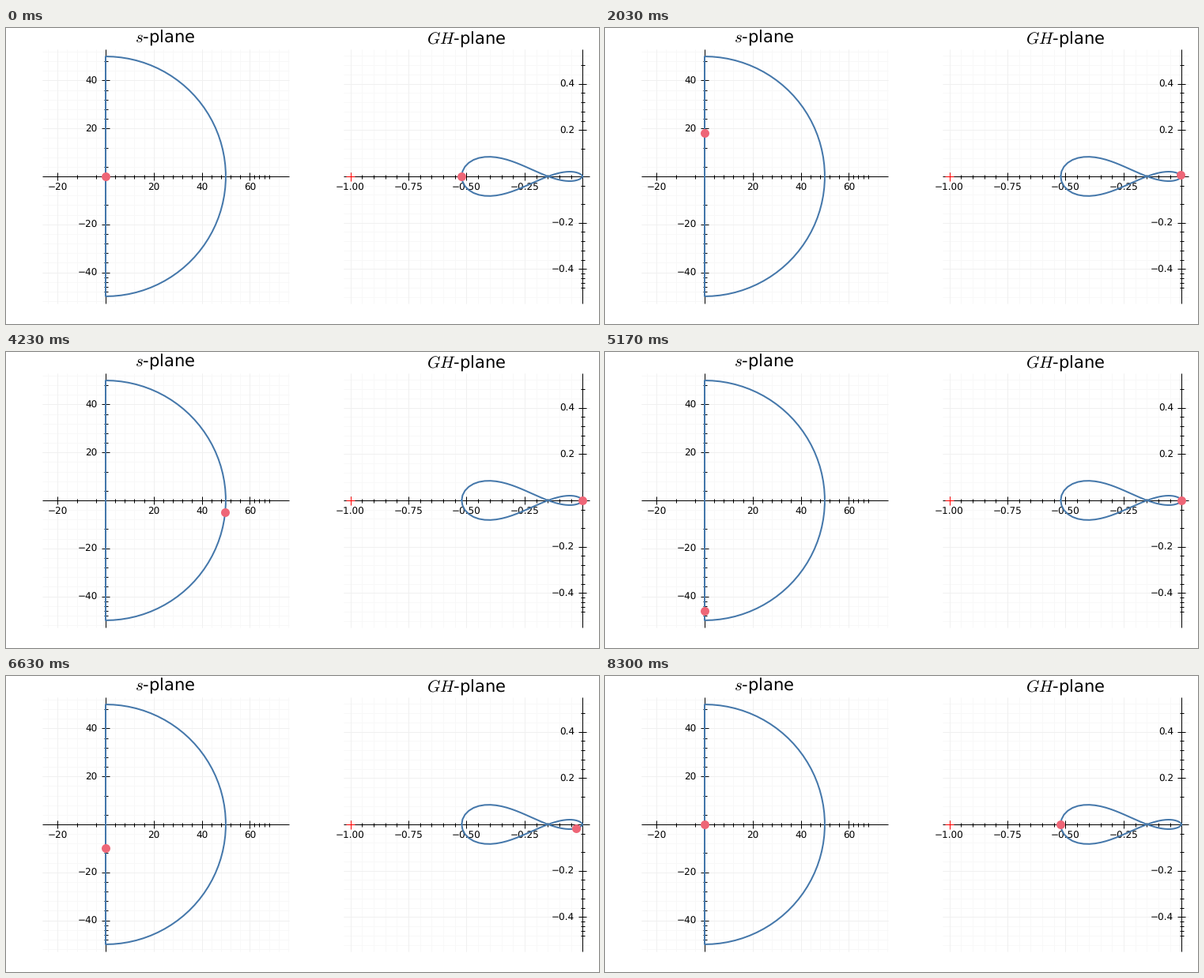
These frames come from a looping animation (750x375 px, 8.33 s). A matplotlib script:

```python
import matplotlib.pyplot as plt
import numpy as np
from matplotlib.animation import FuncAnimation

PX = 0.72  # points per pixel at 100 dpi
BLUE, ROSE = "#4477aa", "#ee6677"
LOOP_MS, SEG = 8330, 50

plt.rcParams.update({"font.family": "DejaVu Sans", "mathtext.fontset": "cm",
                     "text.hinting": "none", "text.hinting_factor": 1})

fig = plt.figure(figsize=(7.5, 3.75), dpi=100, facecolor="white")
ax = fig.add_axes([0, 0, 1, 1])
ax.set(xlim=(0, 750), ylim=(375, 0))
ax.axis("off")


def loop_gain(s):
    return 50 / ((s - 2) * (s + 6) * (s + 8))


def nyquist_contour():
    """Up the imaginary axis, around the right half plane and back to zero."""
    def climb(a, b):
        return 1j * np.linspace(a, b, SEG)

    arc = 50 * np.exp(1j * np.linspace(np.pi / 2, -np.pi / 2, SEG))
    return np.concatenate([climb(0, 10), climb(10, 50), arc,
                           climb(-50, -10), climb(-10, 0)])


def segments(x0, y0, x1, y1, color, width, z):
    """Many separate straight lines drawn as one artist."""
    x0, y0, x1, y1 = np.broadcast_arrays(x0, y0, x1, y1)
    for a, b, c, d in zip(x0.ravel(), y0.ravel(), x1.ravel(), y1.ravel()):
        ax.plot([a, c], [b, d], color=color, lw=width * PX, zorder=z,
                solid_capstyle="butt")


class Plane:
    top, bottom, y0 = 27, 349, 188

    def __init__(self, left, right, x0, scale):
        self.left, self.right, self.x0, self.scale = left, right, x0, scale

    def px(self, x):
        return self.x0 + self.scale * np.asarray(x, float)

    def py(self, y):
        return self.y0 - self.scale * np.asarray(y, float)

    def grid(self, xs, ys, color, z):
        segments(self.px(xs), self.top, self.px(xs), self.bottom, color, 1, z)
        segments(self.left, self.py(ys), self.right, self.py(ys), color, 1, z)

    def axes(self):
        segments(self.left, self.y0, self.right, self.y0, "black", 1, 3)
        segments(self.x0, self.top, self.x0, self.bottom, "black", 1, 3)

    def ticks(self, xs, ys, size):
        x, y = self.px(xs), self.py(ys)
        segments(x, self.y0 - size, x, self.y0 + size, "black", 1, 3)
        segments(self.x0 - size, y, self.x0 + size, y, "black", 1, 3)

    def labels(self, xs, ys, xfmt, yfmt):
        for x in xs:
            self.label(self.px(x), self.y0 + 17.4, xfmt % x, "center")
        for y in ys:
            self.label(self.x0 - 10.2, self.py(y) + 4.4, yfmt % y, "right")

    @staticmethod
    def label(x, y, text, ha):
        ax.text(x, y, text.replace("-", "\u2212"), ha=ha, va="baseline",
                size=12 * PX, zorder=4)

    def title(self, text, y):
        ax.text((self.left + self.right) / 2, y, text, ha="center",
                va="baseline", size=21 * PX)

    def curve(self, z):
        ax.plot(self.px(z.real), self.py(z.imag), color=BLUE, lw=2 * PX,
                solid_joinstyle="round", zorder=5)

    def dot(self):
        return ax.plot([], [], "o", ms=11 * PX, color=ROSE, mew=0, zorder=6)[0]

    def place(self, dot, z):
        dot.set_data([self.px(z.real)], [self.py(z.imag)])


contour = nyquist_contour()
image = loop_gain(contour)

s_plane = Plane(46, 357.5, 126, 3.039)
gh_plane = Plane(426.5, 738, 729.3, 293.7)

# Minor ticks are unevenly spaced around the origin and past the last major.
fine = np.arange(1, 5)
s_x, s_y = [-20, 20, 40, 60], [-40, -20, 20, 40]
s_minor_x = np.r_[-12, -4, 4 * fine, 20 + 4 * fine, 40 + 4 * fine, 60 + 2 * fine]
s_minor_y = np.r_[48, 20 + 4 * fine, 12, 4, -12, -20 - 4 * fine, -40 - 2 * fine]
gh_x, gh_y = [-1, -0.75, -0.5, -0.25], [-0.4, -0.2, 0.2, 0.4]
gh_minor_x = np.add.outer(gh_x, 0.05 * fine).ravel()
gh_minor_y = np.r_[48, 20 + 4 * fine, 12, -4, -12, -20 - 4 * fine, -40 - 2 * fine] / 100

s_plane.grid(np.arange(-24, 77, 4), np.arange(-52, 53, 4), "#f8f8f8", 1)
s_plane.grid(s_x + [0], s_y + [0], "#f0f0f0", 2)
gh_plane.grid(np.arange(-20, 1) / 20, np.arange(-13, 14) / 25, "#f8f8f8", 1)
gh_plane.grid(gh_x + [0], gh_y + [0], "#f0f0f0", 2)

for plane, major, minor in ((s_plane, (s_x, s_y), (s_minor_x, s_minor_y)),
                            (gh_plane, (gh_x, gh_y), (gh_minor_x, gh_minor_y))):
    plane.axes()
    plane.ticks(*major, 5)
    plane.ticks(*minor, 2.5)

s_plane.labels(s_x, s_y, "%d", "%d")
gh_plane.labels(gh_x, gh_y, "%.2f", "%.1f")
s_plane.title("$s$-plane", 18.3)
gh_plane.title("$GH$-plane", 20.7)

s_plane.curve(contour)
gh_plane.curve(image)

# Critical point at -1
cx, cy = gh_plane.px(-1), gh_plane.y0
segments([cx - 5.5, cx], [cy, cy - 5.5], [cx + 5.5, cx], [cy, cy + 5.5],
         "red", 1, 5)

s_dot, gh_dot = s_plane.dot(), gh_plane.dot()


def update(i):
    s_plane.place(s_dot, contour[i])
    gh_plane.place(gh_dot, image[i])
    return s_dot, gh_dot


anim = FuncAnimation(fig, update, frames=len(contour),
                     interval=LOOP_MS / len(contour), repeat=True,
                     repeat_delay=0, blit=True)
plt.show()
```
